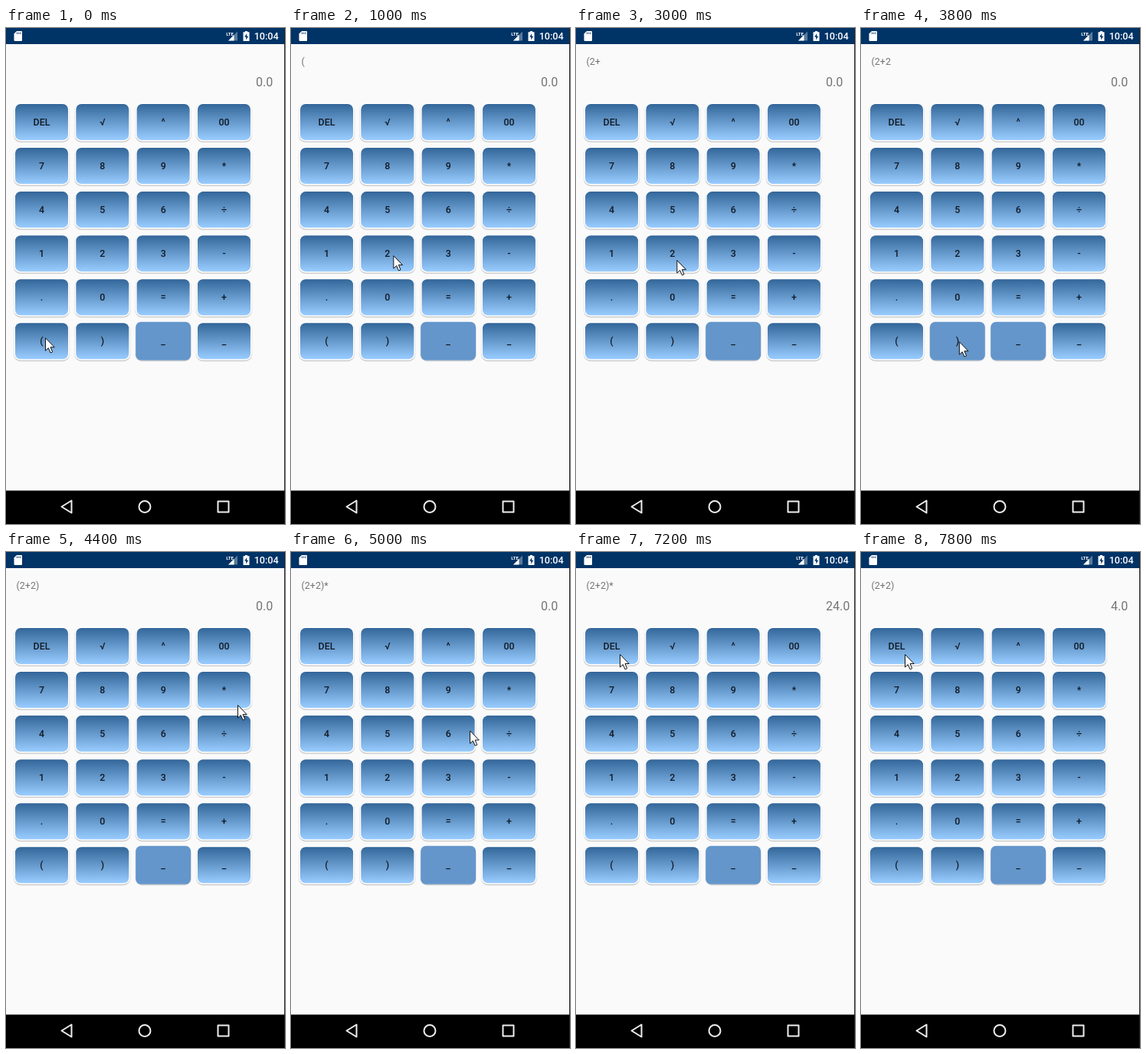
An HTML page that plays this animation: 364 by 646 pixels, repeating every 8 s.

```html
<!DOCTYPE html>
<html lang="en">
<head>
<meta charset="utf-8">
<title>Calculator</title>
<style>
html, body { margin: 0; width: 100%; height: 100%; overflow: hidden; background: #fafafa; }
svg { display: block; width: 100%; height: 100%; font-family: Roboto, sans-serif; }
.label { font-size: 12.4px; font-weight: 500; text-anchor: middle; fill: #111a24; }
.out { fill: #757575; }
.nav { fill: none; stroke: #eee; stroke-width: 2; stroke-linejoin: round; }
</style>
</head>
<body>
<svg viewBox="0 0 364 646">
  <defs>
    <linearGradient id="face" x2="0" y2="1">
      <stop stop-color="#336699"/>
      <stop offset=".5" stop-color="#6699cc"/>
      <stop offset="1" stop-color="#99ccff"/>
    </linearGradient>
  </defs>
  <rect width="364" height="646" fill="#fafafa"/>
  <rect width="364" height="21" fill="#003366"/>
  <g fill="#fff">
    <path d="M14 4H20Q21 4 21 5V16Q21 17 20 17H11.5Q10.5 17 10.5 16V7.5Z"/>
    <path d="M14.5 5.500v2.500M16.700 5.500v2.500M18.900 5.500v2.500" stroke="#003366" stroke-width=".9"/>
    <path d="M302 4.500V16.500H290Z" opacity=".35"/>
    <path d="M297.500 9V16.500H290Z"/>
    <text x="287.200" y="10.300" font-size="6" font-weight="700">LTE</text>
    <path d="M312 4h3v1.300h2.500V17h-8V5.300H312Z"/>
    <path d="M314.200 7l-3 4.800h2V15.500l3-4.800h-2Z" fill="#003366"/>
    <text x="323.700" y="15" font-size="12.600" font-weight="500">10:04</text>
  </g>
  <text id="expr" class="out" x="13.500" y="48" font-size="12.500"></text>
  <text id="result" class="out" x="326" y="76" font-size="16"></text>
  <g id="pad"></g>
  <rect y="602.500" width="364" height="43.500"/>
  <rect x="363" width="1" height="646" fill="#222"/>
  <g class="nav">
    <path d="M72.500 623.500L85.500 615.500V631.500Z"/>
    <circle cx="181" cy="623.500" r="7.500"/>
    <rect x="276.500" y="616.500" width="14" height="14"/>
  </g>
  <path id="cursor" d="M0 0V16.500L3.800 13L6.600 19.300L9.200 18.200L6.500 12H11.700Z" fill="#fff" stroke="#111" stroke-linejoin="round"/>
</svg>
<script>
const LOOP = 8000, STEP = 200, HOLD = 200, TRAVEL = 600;
const $ = id => document.getElementById(id);

function add(tag, attrs, text = '') {
  const el = document.createElementNS('http://www.w3.org/2000/svg', tag);
  for (const k in attrs) el.setAttribute(k, attrs[k]);
  el.textContent = text;
  return $('pad').appendChild(el);
}

function box(x, y, width, height, rx, attrs) {
  return add('rect', { x: x - width / 2, y: y - height / 2, width, height, rx, ...attrs });
}

const keys = {};
'DEL √ ^ 00 7 8 9 * 4 5 6 ÷ 1 2 3 - . 0 = + ( ) _ _'.split(' ').forEach((name, i) => {
  const x = 46.5 + (i % 4) * 79.33, y = 122.5 + Math.floor(i / 4) * 57.05;
  box(x, y + 1.2, 73.5, 51, 9, { opacity: .07 });
  box(x, y + 1, 72, 50.5, 8.5, { opacity: .13 });
  box(x, y, 72, 50, 8.5, { fill: '#fff' });
  box(x, y, 69, 47, 7, { fill: 'url(#face)' });
  const over = box(x, y, 72, 50, 7, { fill: '#6496cb' });
  add('text', { x, y: y + 4.5, class: 'label' }, name);
  keys[name] = { x, y, over };
});

// Each tap: key, arrival, press, pointer offset from the key centre, new result
const taps = [
  ['(', 0, 400, 5, -4],
  ['2', 1000, 1200, 8, 3],
  ['+', 2000, 2400, 3, 5],
  ['2', 3000, 3100, 6, 9],
  [')', 3500, 3800, 2.5, 1],
  ['*', 4400, 4600, 18, 20],
  ['6', 5200, 5400, 5.5, 7.5, '24.0'],
  ['DEL', 6800, 7000, 11, 11],
  ['DEL', 7400, 7400, 11, 11, '4.0'],
].map(([name, arrive, press, dx, dy, result]) => ({
  name, arrive, press, result, x: keys[name].x + dx, y: keys[name].y + dy,
}));

const easeOut = u => 1 - (1 - u) ** 2;

// Leave the last tap once released, then glide to the next one
function pointer(t) {
  let { x, y } = taps[0];
  taps.slice(1).forEach((tap, i) => {
    const from = Math.max(taps[i].press + HOLD, tap.arrive - TRAVEL);
    if (t <= from) return;
    const k = easeOut(Math.min(1, (t - from) / (tap.arrive - from)));
    x += (tap.x - x) * k;
    y += (tap.y - y) * k;
  });
  return [x, y];
}

function draw(ms) {
  const t = Math.floor(ms % LOOP / STEP) * STEP;
  let expr = '', result = '0.0';
  for (const name in keys) keys[name].over.setAttribute('opacity', 0);
  for (const tap of taps) {
    if (t < tap.press) break;
    if (t < tap.press + HOLD) {
      keys[tap.name].over.setAttribute('opacity', 1);
      break;
    }
    expr = tap.name === 'DEL' ? expr.slice(0, -1) : expr + tap.name;
    result = tap.result || result;
  }
  $('expr').textContent = expr;
  $('result').textContent = result;
  $('cursor').setAttribute('transform', `translate(${pointer(t)})`);
}

const start = performance.now();
function tick() {
  draw(performance.now() - start);
  requestAnimationFrame(tick);
}
tick();
</script>
</body>
</html>
```
